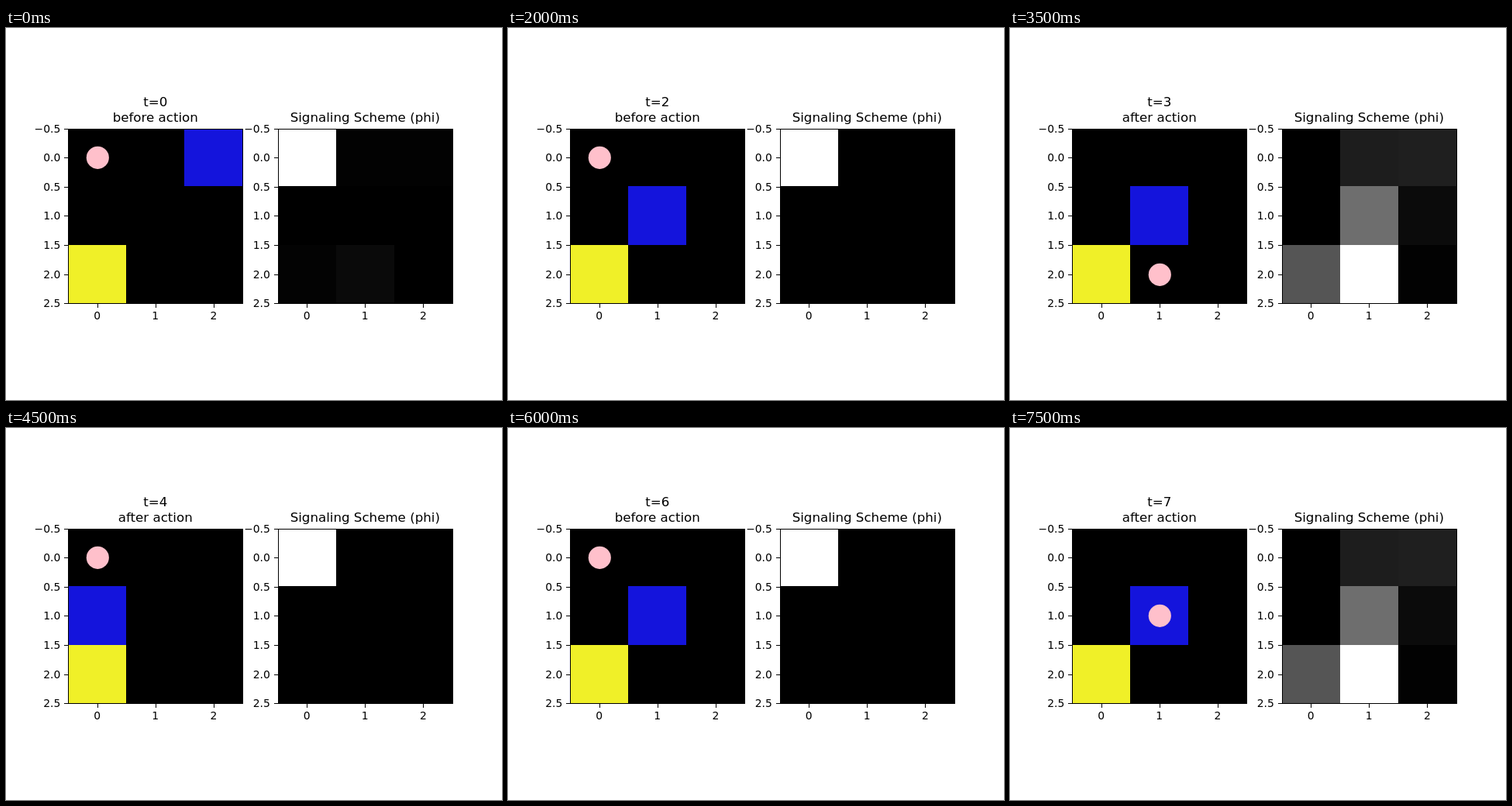
An HTML page that plays this animation: 640 by 480 pixels, repeating every 8000 ms.

```html
<!DOCTYPE html>
<html lang="en">
<head>
<meta charset="utf-8">
<title>Signaling grid</title>
<style>
  html, body { margin: 0; width: 100%; height: 100%; overflow: hidden; background: #fff; }
  svg { display: block; width: 640px; height: 480px; }
  text { font: 13.889px "DejaVu Sans", sans-serif; }
  .title { font-size: 16.667px; text-anchor: middle; }
  .y { text-anchor: end; }
  .x { text-anchor: middle; }
  rect { shape-rendering: crispEdges; }
  .line { fill: none; stroke: #000; stroke-width: 1; shape-rendering: crispEdges; }
</style>
</head>
<body>
<svg id="stage" viewBox="0 0 640 480"></svg>
<script>
const stage = document.getElementById('stage');
const STEP = 500, STEPS = 16;
const ROWS = [130, 204, 280, 355];
const DOT_ROWS = [167.3, 242.3, 318.3];

// Cells are [column, row]; one entry per half step or per time step.
const blueStart = [[2, 0], [1, 0], [1, 0], [1, 1], [1, 1]];
const dotCells = [[0, 0], [0, 0], [0, 0], [1, 2], [0, 0], [1, 1], [0, 0], [1, 1]];
const schemes = {
  first: [255, 2, 2, 0, 0, 0, 3, 10, 0],
  sure: [255, 0, 0, 0, 0, 0, 0, 0, 0],
  spread: [0, 29, 31, 0, 110, 11, 85, 255, 2]
};

function add(tag, attrs, text) {
  const el = document.createElementNS('http://www.w3.org/2000/svg', tag);
  set(el, attrs);
  if (text !== undefined) el.textContent = text;
  return stage.appendChild(el);
}

function set(el, attrs) {
  for (const key in attrs) el.setAttribute(key, attrs[key]);
}

function cellBox(left, [col, row]) {
  return { x: left + 75 * col, y: ROWS[row], width: 75, height: ROWS[row + 1] - ROWS[row] };
}

function addCell(left, cell, fill) {
  return add('rect', { ...cellBox(left, cell), fill });
}

function addAxes(left, exactLeft) {
  add('rect', { x: left + .5, y: 130.5, width: 225, height: 225, class: 'line' });
  for (let i = 0; i < 7; i++) {
    const y = Math.round(129.67 + i * 37.576);
    add('path', { d: `M${left - 5} ${y + .5}h5`, class: 'line' });
    const label = (i / 2 - .5).toFixed(1).replace('-', '\u2212');
    add('text', { x: exactLeft - 9.72, y: y + 5, class: 'y' }, label);
  }
  for (let i = 0; i < 3; i++) {
    const x = exactLeft + 37.576 + i * 75.15;
    add('path', { d: `M${Math.round(x) + .5} 356v5`, class: 'line' });
    add('text', { x, y: 376, class: 'x' }, i);
  }
}

add('rect', { width: 640, height: 480, fill: '#fff' });
add('rect', { x: 80, y: 130, width: 225, height: 225 });
addCell(80, [0, 2], '#f0f028');
const blue = addCell(80, [2, 0], '#1414dc');
const dot = add('circle', { r: 14.58, fill: '#ffc0cb' });
const phi = schemes.first.map((v, i) => addCell(351, [i % 3, Math.floor(i / 3)], '#000'));
addAxes(80, 80);
addAxes(351, 350.55);
const timeText = add('text', { x: 192.73, y: 101, class: 'title' }, '');
const phaseText = add('text', { x: 192.73, y: 121, class: 'title' }, '');
add('text', { x: 463.27, y: 121, class: 'title' }, 'Signaling Scheme (phi)');

function show(step) {
  const t = Math.floor(step / 2);
  timeText.textContent = 't=' + t;
  phaseText.textContent = (step % 2 ? 'after' : 'before') + ' action';

  // After the opening, blue swaps between two cells with every action.
  const blueCell = blueStart[step] || [Math.floor((step - 3) / 2) % 2, 1];
  set(blue, cellBox(80, step < 5 ? blueCell : [(t + 1) % 2 === (step % 2) ? 0 : 1, 1]));

  const [col, row] = dotCells[t];
  set(dot, { cx: 118.3 + 75 * col, cy: DOT_ROWS[row] });

  const scheme = t === 0 ? schemes.first : t > 2 && t % 2 ? schemes.spread : schemes.sure;
  scheme.forEach((v, i) => set(phi[i], { fill: `rgb(${v},${v},${v})` }));
}

let shown = -1;
function tick() {
  const step = Math.floor(performance.now() / STEP) % STEPS;
  if (step !== shown) show(shown = step);
  requestAnimationFrame(tick);
}
tick();
</script>
</body>
</html>
```
